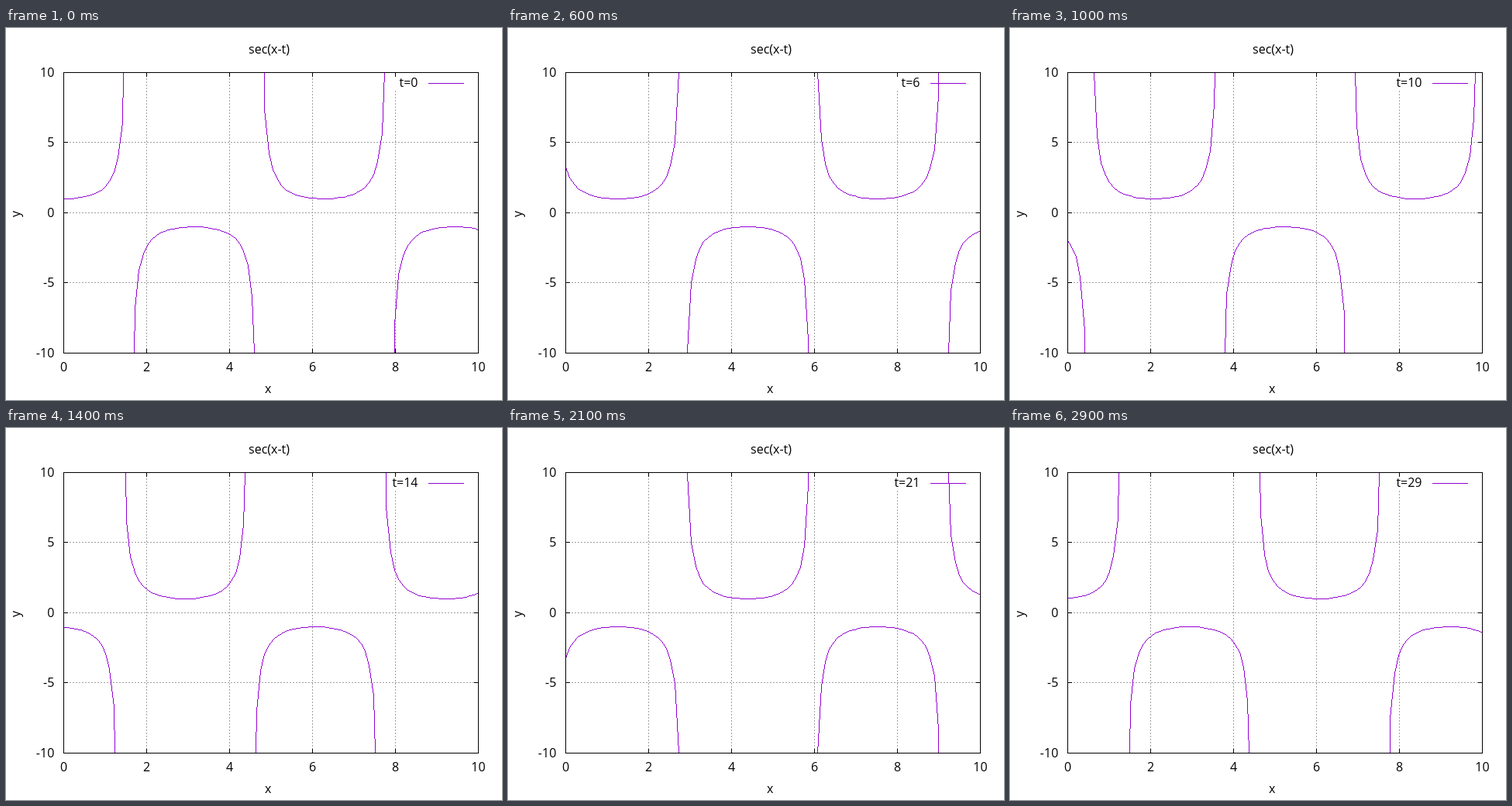
An HTML page that plays this animation: 640x480 px, repeating every 3000 ms.

```html
<!DOCTYPE html>
<html lang="en">
<head>
<meta charset="utf-8">
<title>sec(x-t)</title>
<style>
html, body { margin: 0; width: 100%; height: 100%; overflow: hidden; background: #fff; }
svg { display: block; }
text { font: 16px "Open Sans", "Noto Sans", sans-serif; fill: #000; }
.mid { text-anchor: middle; }
.end { text-anchor: end; }
path, rect { shape-rendering: crispEdges; }
.line { fill: none; stroke-width: 1; }
</style>
</head>
<body>
<svg width="640" height="480" viewBox="0 0 640 480">
  <path id="grid" class="line" stroke="#a0a0a0" stroke-dasharray="2 2"/>
  <path id="curve" fill="#9400d3"/>
  <rect x="545" y="71" width="46" height="1" fill="#9400d3"/>
  <path id="axes" class="line" stroke="#000"/>
  <g id="labels"></g>
  <text class="mid" x="339.5" y="33">sec(x-t)</text>
  <text class="mid" x="338.3" y="471">x</text>
  <text class="mid" transform="translate(18 240) rotate(-90)">y</text>
  <text id="key" class="end" x="531.5" y="76"></text>
</svg>
<script>
const LEFT = 74, RIGHT = 609, TOP = 57, BOTTOM = 419;
const STEPS = 30, STEP_MS = 100, SAMPLES = 100, LIMIT = 10, TIC = 5;
const $ = id => document.getElementById(id);
const mapX = x => Math.floor(LEFT + x * (RIGHT - LEFT) / 10 + 0.5);
const mapY = y => BOTTOM - Math.floor((y + LIMIT) * (BOTTOM - TOP) / (2 * LIMIT) + 0.5);

function addLabel(text, cls, x, y) {
  const el = document.createElementNS("http://www.w3.org/2000/svg", "text");
  el.setAttribute("class", cls);
  el.setAttribute("x", x);
  el.setAttribute("y", y);
  el.textContent = text;
  $("labels").append(el);
}

function drawFrame() {
  let grid = "";
  let axes = `M${LEFT + .5} ${TOP + .5}H${RIGHT + .5}V${BOTTOM + .5}H${LEFT + .5}Z`;
  for (let v = 0; v <= 10; v += 2) {
    const x = mapX(v) + .5;
    axes += `M${x} ${BOTTOM + 1}v${-TIC - 1}M${x} ${TOP}v${TIC + 1}`;
    // the grid leaves room for the key
    if (v > 0 && v < 10) grid += `M${x} ${BOTTOM}V${v === 8 ? 80 : TOP}`;
    addLabel(v, "mid", x, 443);
  }
  for (let v = -10; v <= 10; v += 5) {
    const y = mapY(v) + .5;
    axes += `M${LEFT} ${y}h${TIC + 1}M${RIGHT + 1} ${y}h${-TIC - 1}`;
    if (Math.abs(v) < 10) grid += `M${LEFT} ${y}H${RIGHT}`;
    addLabel(v, "end", 62.3, y + 5);
  }
  $("grid").setAttribute("d", grid);
  $("axes").setAttribute("d", axes);
}

// one-pixel Bresenham line as unit squares
function pixelLine(x0, y0, x1, y1) {
  const steep = Math.abs(y1 - y0) > Math.abs(x1 - x0);
  if (steep) [x0, y0, x1, y1] = [y0, x0, y1, x1];
  if (x0 > x1) [x0, y0, x1, y1] = [x1, y1, x0, y0];
  const dx = x1 - x0, dy = Math.abs(y1 - y0), dir = Math.sign(y1 - y0);
  let err = 2 * dy - dx, d = "";
  for (let x = x0, y = y0; x <= x1; x++) {
    d += `M${steep ? y : x} ${steep ? x : y}h1v1h-1z`;
    if (err >= 0) { y += dir; err -= 2 * dx; }
    err += 2 * dy;
  }
  return d;
}

const inside = p => Math.abs(p.y) <= LIMIT;

// pull an outside point back to the plot's edge
function clip(p, from) {
  if (inside(p)) return p;
  const y = Math.sign(p.y) * LIMIT;
  return { x: from.x + (p.x - from.x) * (y - from.y) / (p.y - from.y), y };
}

function secant(shift) {
  let d = "", prev = null;
  for (let i = 0; i < SAMPLES; i++) {
    const x = 10 * i / (SAMPLES - 1);
    const p = { x, y: 1 / Math.cos(x - shift) };
    if (prev && (inside(prev) || inside(p))) {
      const a = clip(prev, p), b = clip(p, prev);
      d += pixelLine(mapX(a.x), mapY(a.y), mapX(b.x), mapY(b.y));
    }
    prev = p;
  }
  return d;
}

let shown = -1;
function update(ms) {
  const t = Math.floor(ms / STEP_MS) % STEPS;
  if (t === shown) return;
  shown = t;
  $("curve").setAttribute("d", secant(2 * Math.PI * t / STEPS));
  $("key").textContent = "t=" + t;
}

drawFrame();
update(0);
const start = performance.now();
function tick() {
  update(performance.now() - start);
  requestAnimationFrame(tick);
}
requestAnimationFrame(tick);
</script>
</body>
</html>
```
